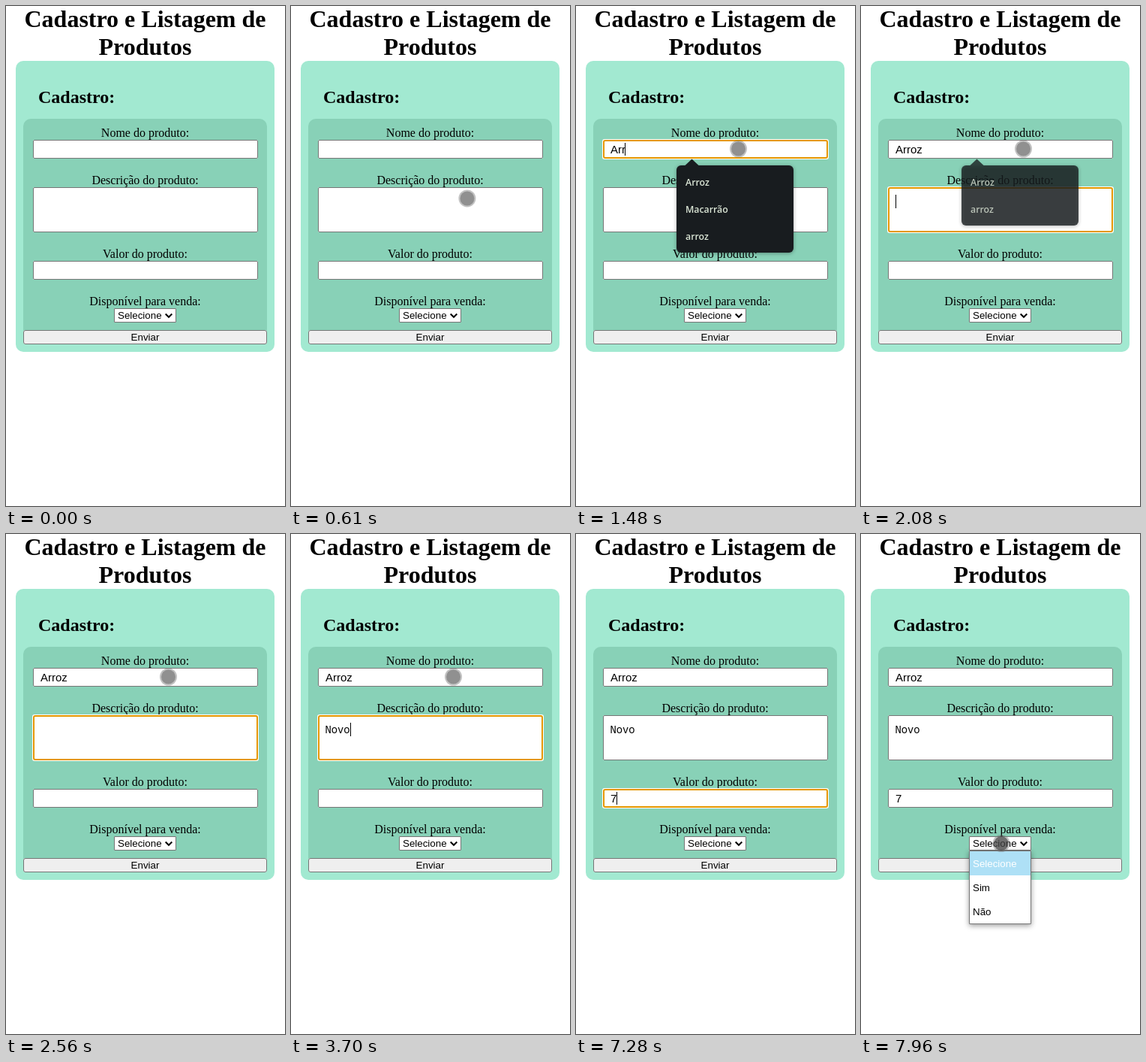
Recreate the animation shown at these times as an HTML page with a canvas. Size 372 px wide and 665 px high, loop 8 s.

```html
<!DOCTYPE html>
<html lang="pt">
<head>
<meta charset="utf-8">
<title>Cadastro</title>
<style>
html, body { margin: 0; width: 100%; height: 100%; overflow: hidden; background: #fff; }
canvas { display: block; }
</style>
</head>
<body>
<canvas id="stage" width="372" height="665"></canvas>
<script>
const ctx = document.getElementById('stage').getContext('2d');
const LOOP = 8000;
const SERIF = '"Liberation Serif", "Times New Roman", serif';
const SANS = '"Liberation Sans", Arial, sans-serif';
const MONO = '"Noto Sans Mono", monospace';
const POPUP = '600 12.3px "Open Sans", sans-serif';
const GRAY = '#767676';
const CENTER = 185.5;

const FIELDS = {
  name: { y: 178, h: 25, base: 196, caretY: 182, caretH: 17, font: `15px ${SANS}` },
  info: { y: 241, h: 60, base: 265, caretY: 251, caretH: 18, font: `13.75px ${MONO}` },
  price: { y: 339, h: 25, base: 357, caretY: 343, caretH: 17, font: `15px ${SANS}` }
};
const KEYS = {
  name: ['Arroz', [1020, 1280, 1480, 1580, 1680]],
  info: ['Novo', [3300, 3400, 3500, 3700]],
  price: ['7', [6820]]
};
const CARET_OFF = [[2560, 3100], [4680, 5160], [5690, 6160], [6690, 6820]];
const HINTS = ['Arroz', 'Macarrão', 'jogos', 'livro', 'Novo', 'arroz'];

const within = (t, a, b) => t >= a && t < b;
const ease = p => p * p * (3 - 2 * p);
const mix = (a, b, p) => a + (b - a) * p;

function box(x, y, w, h, r, color) {
  ctx.fillStyle = color;
  ctx.beginPath();
  ctx.roundRect(x, y, w, h, r);
  ctx.fill();
}

function frame(x, y, w, h, r, color, line = 1) {
  ctx.strokeStyle = color;
  ctx.lineWidth = line;
  ctx.beginPath();
  ctx.roundRect(x + line / 2, y + line / 2, w - line, h - line, r);
  ctx.stroke();
}

function text(str, x, y, font, color = '#000', align = 'left') {
  ctx.font = font;
  ctx.fillStyle = color;
  ctx.textAlign = align;
  ctx.fillText(str, x, y);
}

function disc(x, y, r, color) {
  ctx.fillStyle = color;
  ctx.beginPath();
  ctx.arc(x, y, r, 0, Math.PI * 2);
  ctx.fill();
}

function shadow(alpha, blur, dy) {
  ctx.shadowColor = `rgba(0,0,0,${alpha})`;
  ctx.shadowBlur = blur;
  ctx.shadowOffsetY = dy;
}

function typed(id, t) {
  const [word, times] = KEYS[id];
  return word.slice(0, times.filter(k => t >= k).length);
}

function focusAt(t) {
  if (within(t, 810, 2080)) return 'name';
  if (within(t, 2080, 4160)) return 'info';
  if (within(t, 4160, 7885)) return 'price';
  return '';
}

function drawPage() {
  ctx.fillStyle = '#fff';
  ctx.fillRect(0, 0, 372, 665);
  text('Cadastro e Listagem de', CENTER, 28, `bold 32px ${SERIF}`, '#000', 'center');
  text('Produtos', CENTER, 65, `bold 32px ${SERIF}`, '#000', 'center');
  box(13, 73, 345, 387, 10, '#a2e9d1');
  text('Cadastro:', 43, 129, `bold 24px ${SERIF}`);
  box(23, 150, 325, 300, [10, 10, 3, 3], '#88d1b7');

  const labels = [['Nome do produto:', 174], ['Descrição do produto:', 237],
    ['Valor do produto:', 335], ['Disponível para venda:', 398]];
  for (const [label, y] of labels) text(label, CENTER, y, `16px ${SERIF}`, '#000', 'center');

  box(144, 402, 83, 19, 0, '#fff');
  frame(144, 402, 83, 19, 0, GRAY);
  text('Selecione', 149, 416, `13.33px ${SANS}`);
  ctx.strokeStyle = '#000';
  ctx.lineWidth = 2;
  ctx.beginPath();
  ctx.moveTo(212.7, 409.5);
  ctx.lineTo(217, 413.8);
  ctx.lineTo(221.3, 409.5);
  ctx.stroke();

  box(23, 431, 325, 19, 3, '#efefef');
  frame(23, 431, 325, 19, 2.5, GRAY);
  text('Enviar', CENTER, 445, `13.33px ${SANS}`, '#000', 'center');
}

function drawField(id, t, focused) {
  const f = FIELDS[id];
  if (focused) {
    box(35, f.y - 1, 302, f.h + 2, 3, '#fff');
    frame(36, f.y, 300, f.h, 2, '#e59700', 2);
  } else {
    box(36, f.y, 300, f.h, 2, '#fff');
    frame(36, f.y, 300, f.h, 1.5, GRAY);
  }
  const word = typed(id, t);
  text(word, id === 'info' ? 45.5 : 46, f.base, f.font);
  if (focused && !CARET_OFF.some(([a, b]) => within(t, a, b))) {
    ctx.fillStyle = '#000';
    ctx.fillRect(Math.floor(46 + ctx.measureText(word).width), f.caretY, 1, f.caretH);
  }
}

function drawHints(t) {
  if (!within(t, 810, 2290)) return;
  const query = typed('name', t).toLowerCase();
  const rows = HINTS.filter(h => h.toLowerCase().includes(query));
  const opening = t < 950;
  const h = opening ? 122 : 8 + 36 * rows.length;
  const leaving = t >= 2080 ? Math.floor((t - 2080) / 70) : -1;

  ctx.save();
  ctx.globalAlpha = t < 880 ? 0.45 : leaving < 0 ? 1 : [0.79, 0.45, 0.15][leaving];
  const color = '#181c1f';
  if (!opening) shadow(0.35, 5, 1);
  ctx.fillStyle = color;
  ctx.beginPath();
  ctx.roundRect(134, 212, 156, h, opening ? [6, 6, 0, 0] : 6);
  ctx.fill();
  shadow(0, 0, 0);
  ctx.beginPath();
  ctx.moveTo(145.5, 212);
  ctx.lineTo(154.5, 203.5);
  ctx.lineTo(163.5, 212);
  ctx.fill();
  rows.slice(0, opening ? 3 : 6).forEach((row, i) => text(row, 146, 239 + 36 * i, POPUP, '#dbe6d6'));
  ctx.restore();
}

function drawOptions(t) {
  if (t < 7885) return;
  ctx.save();
  ctx.globalAlpha = t < 7955 ? 0.7 : 1;
  shadow(0.4, 7, 2);
  box(144, 421, 83, 98, 0, '#fff');
  shadow(0, 0, 0);
  box(145, 422, 81, 32, 0, '#aee0f6');
  frame(144, 421, 83, 98, 0, GRAY);
  ['Selecione', 'Sim', 'Não'].forEach((row, i) =>
    text(row, 149, 443 + 32 * i, `13.33px ${SANS}`, i ? '#000' : '#fff'));
  ctx.restore();
}

function drawDot(x, y, pressed) {
  disc(x, y, 11.5, 'rgba(110,110,110,.42)');
  disc(x, y, 9.5, pressed ? 'rgba(55,55,55,.6)' : 'rgba(110,110,110,.6)');
}

function drawMoveIcon(x, y) {
  const pass = (color, line) => {
    ctx.strokeStyle = ctx.fillStyle = color;
    for (let i = 0; i < 4; i++) {
      ctx.save();
      ctx.translate(x, y);
      ctx.rotate(i * Math.PI / 2);
      ctx.beginPath();
      ctx.moveTo(0, 0);
      ctx.lineTo(0, -5);
      ctx.lineWidth = 1.8 + line;
      ctx.stroke();
      ctx.beginPath();
      ctx.moveTo(0, -7.5);
      ctx.lineTo(3.2, -4);
      ctx.lineTo(-3.2, -4);
      ctx.closePath();
      ctx.lineWidth = 0.1 + line;
      ctx.fill();
      ctx.stroke();
      ctx.restore();
    }
  };
  pass('#fff', 2);
  pass('#000', 0);
}

function drawPointer(t) {
  if (t < 70) return;
  if (t < 740) {
    const p = ease(Math.min(1, Math.floor((t - 70) / 82.2) / 8));
    drawDot(mix(337, 216, p), mix(612, 190, p));
  } else if (t < 950) {
    drawMoveIcon(216, 190);
  } else if (t < 7280) {
    drawDot(216.5, 190);
  } else if (t >= 7355) {
    const p = ease(Math.min(1, Math.floor((t - 7280) / 75.5) / 7));
    drawDot(mix(216, 187, p) + 14 * p * (1 - p), mix(190, 411.5, p), t >= 7885);
  }
}

function render(t) {
  const focus = focusAt(t);
  drawPage();
  for (const id in FIELDS) drawField(id, t, id === focus);
  drawHints(t);
  drawOptions(t);
  drawPointer(t);
}

const start = performance.now();
function tick() {
  render((performance.now() - start) % LOOP);
  requestAnimationFrame(tick);
}
tick();
</script>
</body>
</html>
```
